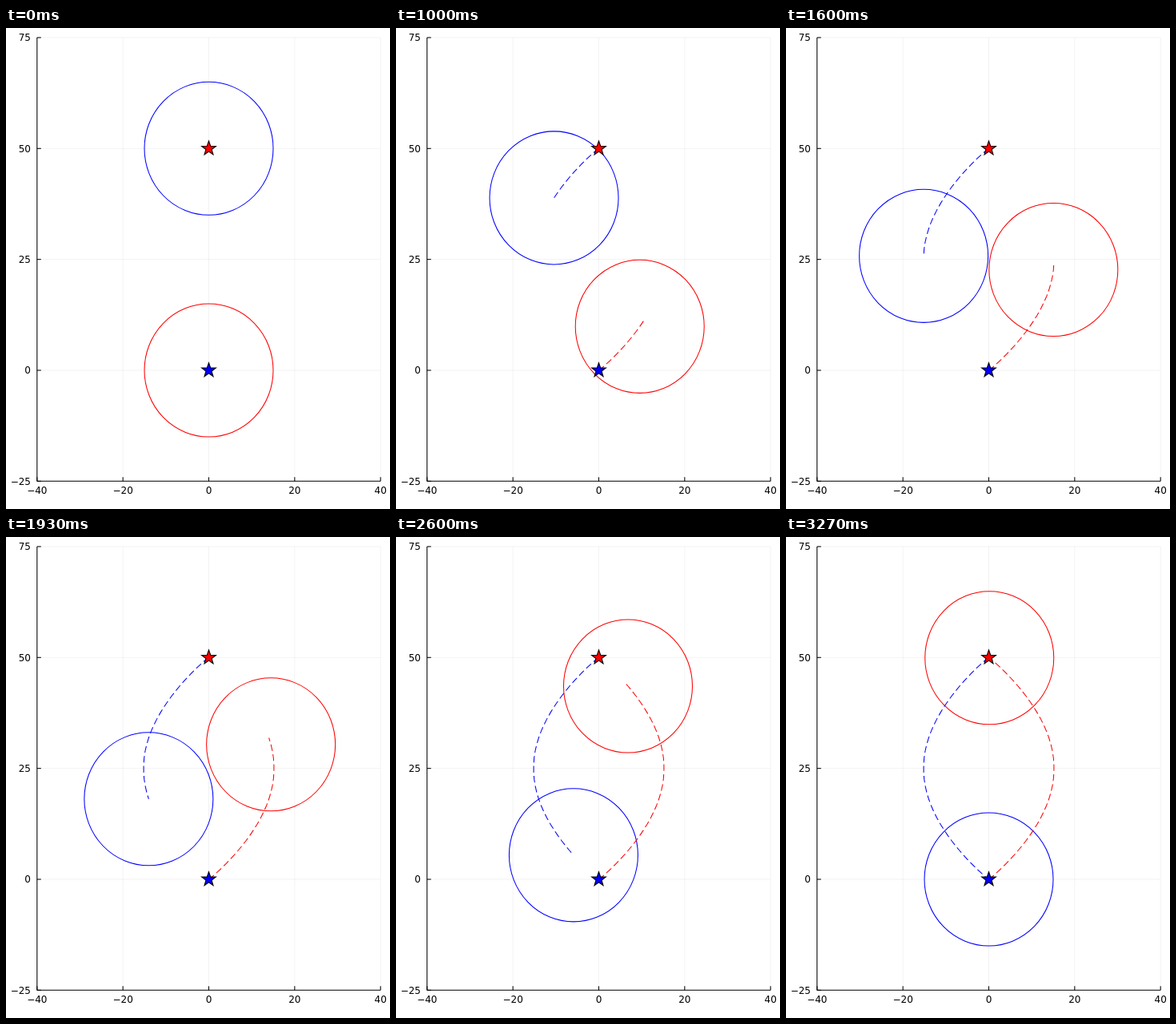
Animation of 480x600 px, one loop 3.34 s. Source, as an HTML page with a canvas:

```html
<!DOCTYPE html>
<html lang="en">
<head>
<meta charset="utf-8">
<title>Two discs swapping places</title>
<style>
html, body { margin: 0; width: 100%; height: 100%; overflow: hidden; background: #fff; }
canvas { display: block; width: 480px; height: 600px; }
</style>
</head>
<body>
<canvas id="stage" width="480" height="600"></canvas>
<script>
const ctx = document.getElementById('stage').getContext('2d');
const LOOP = 3340, LAST = 49, RADIUS = 15, LINE = 1.04;
const BLUE = '#0000ff', RED = '#ff0000';
const SX = 5.367, SY = 5.534;
const px = x => 253.5 + x * SX;
const py = y => 427 - y * SY;
const smooth = s => s * s * (3 - 2 * s);

// Position along the avoiding path: sideways swing and distance travelled.
function path(k) {
  const t = k / LAST;
  const s = 1 - Math.abs(2 * t - 1);
  return {
    side: 15.17 * smooth(s) + 1.68 * s * Math.pow(1 - s, 1.2),
    along: 50 * smooth(t) + 0.09 * Math.sin(4 * Math.PI * t)
  };
}

const bluePos = k => { const p = path(k); return [px(-p.side), py(50 - p.along)]; };
const redPos = k => { const p = path(k); return [px(p.side), py(p.along)]; };

function line(x1, y1, x2, y2) {
  ctx.beginPath();
  ctx.moveTo(x1, y1);
  ctx.lineTo(x2, y2);
  ctx.stroke();
}

function axes() {
  const xs = [-40, -20, 0, 20, 40], ys = [-25, 0, 25, 50, 75];
  const left = px(-40), right = px(40), top = py(75), bottom = py(-25);
  const label = n => String(n).replace('-', '\u2212');

  ctx.lineWidth = 0.52;
  ctx.strokeStyle = 'rgba(0,0,0,0.1)';
  xs.forEach(x => line(px(x), top, px(x), bottom));
  ys.forEach(y => line(left, py(y), right, py(y)));

  ctx.lineWidth = LINE;
  ctx.strokeStyle = ctx.fillStyle = '#000';
  line(left, bottom, right, bottom);
  line(left, top, left, bottom);
  ctx.font = '12px "DejaVu Sans", sans-serif';
  ctx.textAlign = 'center';
  xs.forEach(x => {
    line(px(x), bottom, px(x), bottom - 5);
    ctx.fillText(label(x), px(x), 581);
  });
  ctx.textAlign = 'right';
  ys.forEach(y => {
    line(left, py(y), left + 5, py(y));
    ctx.fillText(label(y), 31, py(y) + 4.3);
  });
}

function disc([x, y], color) {
  ctx.strokeStyle = color;
  ctx.beginPath();
  ctx.ellipse(x, y, RADIUS * SX, RADIUS * SY, 0, 0, 2 * Math.PI);
  ctx.stroke();
}

function trail(pos, k, color) {
  ctx.strokeStyle = color;
  ctx.setLineDash([8.33, 4.17]);
  ctx.beginPath();
  for (let i = 0; i <= k; i++) ctx.lineTo(...pos(i));
  ctx.stroke();
  ctx.setLineDash([]);
}

function star(x, y, color) {
  ctx.beginPath();
  for (let i = 0; i < 10; i++) {
    const r = i % 2 ? 3.76 : 9.4, a = (i / 5 - 0.5) * Math.PI;
    ctx.lineTo(x + r * Math.cos(a), y + r * Math.sin(a));
  }
  ctx.closePath();
  ctx.fillStyle = color;
  ctx.strokeStyle = '#000';
  ctx.fill();
  ctx.stroke();
}

// Fifteen steps a second, starting on whole hundredths.
const stepStart = k => Math.round(k * 20 / 3) * 10;
function stepAt(t) {
  let k = 0;
  while (k < LAST && stepStart(k + 1) <= t) k++;
  return k;
}

function draw(t) {
  const k = stepAt(t);
  ctx.fillStyle = '#fff';
  ctx.fillRect(0, 0, 480, 600);
  axes();
  disc(bluePos(k), BLUE);
  disc(redPos(Math.max(k - 1, 0)), RED); // red runs one step behind
  trail(bluePos, k, BLUE);
  trail(redPos, k, RED);
  star(px(0), py(0), BLUE);
  star(px(0), py(50), RED);
}

const begin = performance.now();
function tick() {
  draw((performance.now() - begin) % LOOP);
  requestAnimationFrame(tick);
}
tick();
</script>
</body>
</html>
```
